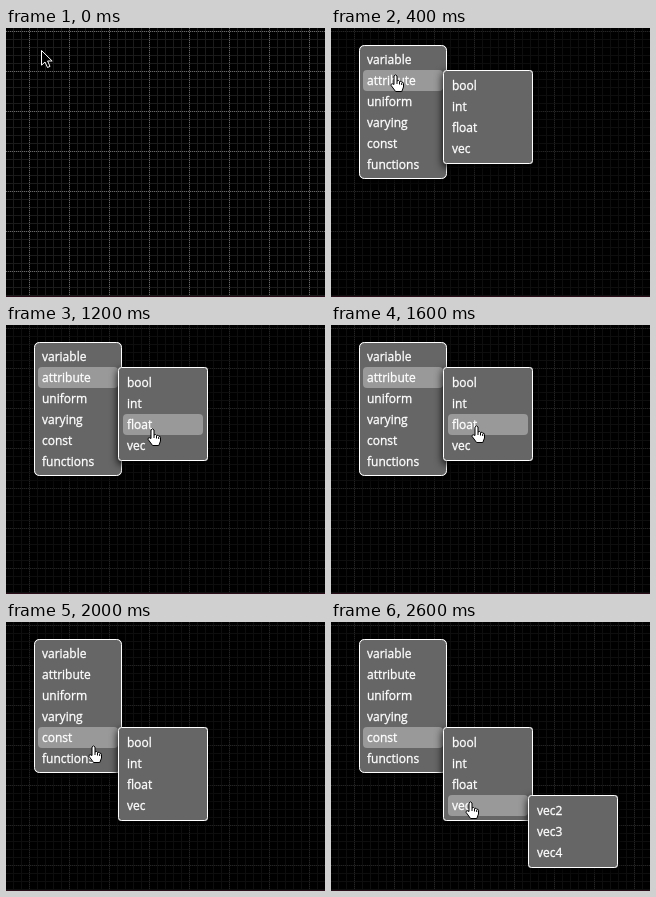
Write an HTML page with a canvas that moves like this. It is 319 px wide and 269 px high and loops after 4600 ms.

```html
<!DOCTYPE html>
<html>
<head>
<meta charset="utf-8">
<style>
html, body { margin: 0; width: 319px; height: 269px; overflow: hidden; background: #000; }
canvas { display: block; }
</style>
</head>
<body>
<canvas id="stage" width="319" height="269"></canvas>
<script>
const ctx = document.getElementById('stage').getContext('2d');
const ROW = 21, ROW_WIDTH = 80, STEP = 200, LOOP = 4600;
const MAIN = ['variable', 'attribute', 'uniform', 'varying', 'const', 'functions'];
const TYPES = ['bool', 'int', 'float', 'vec'];
const VECTORS = ['vec2', 'vec3', 'vec4'];

// Each step: hovered main row, hovered type row, hand position
const steps = [
  null,
  [0, -1, 31, 22],
  [1, -1, 59, 46],
  [1, -1, 117, 52],
  [1, 0, 137, 67],
  [1, 1, 140, 80],
  [1, 2, 141, 103],
  [1, 3, 142, 112],
  [1, 2, 140, 100],
  [3, -1, 97, 97],
  [4, -1, 82, 123],
  [4, 0, 124, 123],
  [4, 2, 134, 170],
  [4, 3, 134, 179]
];

const arrow = new Path2D('M.5 .5V15.2L4 12L6.5 17.5L9 16.4L6.6 11H11.2Z');
const hand = new Path2D('M4 10.5V2Q5.5 -.3 7 2V7Q8.7 5.7 9.5 7.5Q11.2 6.5 11.8 8.3Q13.3 7.7 13.5 9.3V13L11.8 17.5H5.6L1 11.3Q1.2 8.6 4 10.5Z');
const knuckles = new Path2D('M7 7V10M9.5 8V10.5M11.7 9V11');

function gridLines(first, gap, color, dash) {
  ctx.strokeStyle = color;
  ctx.lineWidth = 1;
  ctx.setLineDash(dash);
  ctx.beginPath();
  for (let x = first[0]; x < 319; x += gap) {
    ctx.moveTo(x + .5, 0);
    ctx.lineTo(x + .5, 268);
  }
  for (let y = first[1]; y < 268; y += gap) {
    ctx.moveTo(0, y + .5);
    ctx.lineTo(319, y + .5);
  }
  ctx.stroke();
  ctx.setLineDash([]);
}

function drawGrid(bright) {
  ctx.fillStyle = '#000';
  ctx.fillRect(0, 0, 319, 269);
  gridLines([7, 3], 8, bright ? '#1b1b1b' : '#0e0e0e', []);
  gridLines([23, 3], 40, bright ? '#666' : '#242424', [1, 1]);
  ctx.fillStyle = '#2a0c18';
  ctx.fillRect(0, 268, 319, 1);
}

function roundBox(x, y, w, h, r) {
  ctx.beginPath();
  ctx.roundRect(x, y, w, h, r);
}

// x, y: corner of the first row
function drawMenu(items, x, y, hover, pad, radius) {
  const w = ROW_WIDTH + 2 * pad, h = items.length * ROW + 2 * pad;
  ctx.save();
  ctx.shadowColor = '#000';
  ctx.shadowBlur = 8;
  ctx.shadowOffsetY = 3;
  ctx.fillStyle = '#666';
  roundBox(x - pad, y - pad, w, h, radius);
  ctx.fill();
  ctx.restore();
  ctx.strokeStyle = '#fff';
  ctx.lineWidth = 1;
  roundBox(x - pad + .5, y - pad + .5, w - 1, h - 1, radius);
  ctx.stroke();
  if (hover >= 0) {
    ctx.fillStyle = '#999';
    roundBox(x, y + hover * ROW, ROW_WIDTH, ROW, 4);
    ctx.fill();
  }
  ctx.font = '12px "Open Sans", sans-serif';
  ctx.fillStyle = '#fff';
  ctx.lineWidth = .3;
  items.forEach((text, i) => {
    ctx.fillText(text, x + 4, y + i * ROW + 15);
    ctx.strokeText(text, x + 4, y + i * ROW + 15);
  });
}

function drawCursor(path, x, y, fill, line) {
  ctx.save();
  ctx.translate(x, y);
  ctx.fillStyle = fill;
  ctx.strokeStyle = line;
  ctx.lineWidth = 1;
  ctx.fill(path);
  ctx.stroke(path);
  if (path === hand) ctx.stroke(knuckles);
  ctx.restore();
}

function draw(now) {
  const index = Math.min(Math.floor(now % LOOP / STEP), steps.length - 1);
  const step = steps[index];
  drawGrid(!step);
  if (step) {
    const [main, type, x, y] = step;
    const top = 21 + main * ROW;
    drawMenu(MAIN, 32, 21, main, 4, 5);
    drawMenu(TYPES, 117, top + 5, type, 5, 3);
    if (type === 3) drawMenu(VECTORS, 202, top + 73, -1, 5, 3);
    drawCursor(hand, x, y, '#fff', '#000');
  } else {
    drawCursor(arrow, 35, 22, '#000', '#fff');
  }
}

let start;
function tick(now) {
  start ??= now;
  draw(now - start);
  requestAnimationFrame(tick);
}
draw(0);
requestAnimationFrame(tick);
</script>
</body>
</html>
```
